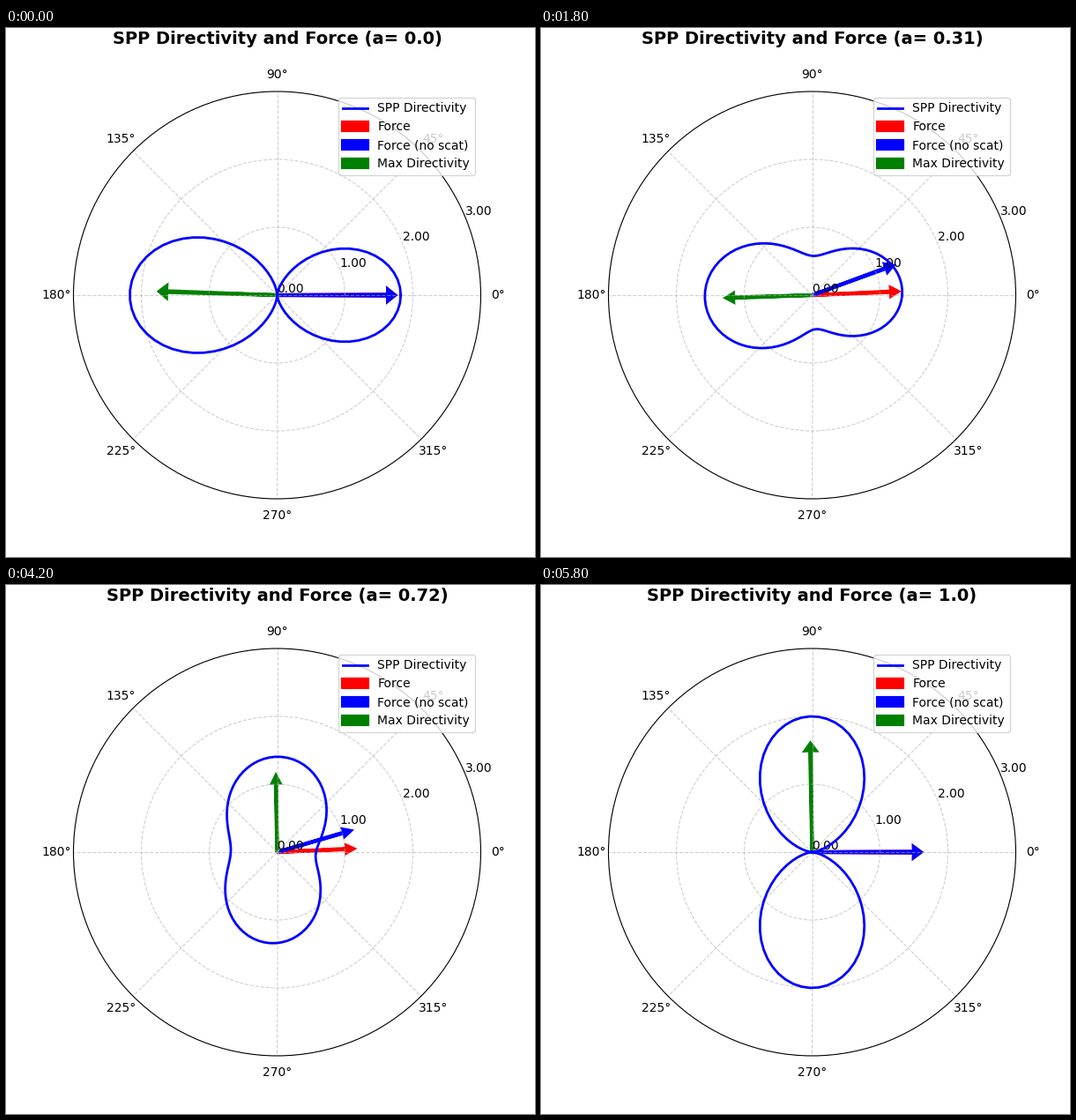
Animation of 600x600 px, one loop 6 s. Source, as a matplotlib script:

```python
import numpy as np
import matplotlib.pyplot as plt
from matplotlib.animation import FuncAnimation

FRAMES = 30
theta = np.linspace(0, 2 * np.pi, 100)
sweep = np.linspace(0, 1, FRAMES)

# Vertical dipole part and phase lag between the in-plane dipole parts
PZ = -0.0438 + 0.0198j
PHASE = np.exp(1.531j)


def directivity(a):
    px, py = np.sqrt(1.2 * (1 - a)), np.sqrt(a) * PHASE
    d = np.abs(px * (np.cos(theta) + PZ) + py * np.sin(theta)) ** 2
    return d / d[:-1].mean()


def force_angles(a):
    b = a / (a + 1.2 * (1 - a))
    s = np.sqrt(b * (1 - b))
    return 0.096 * s, np.arctan(s / (1.03 + 0.6 * b + 0.32 * b**2))


fig = plt.figure(figsize=(6, 6), dpi=100)
ax = fig.add_subplot(projection="polar")
line, = ax.plot(theta, directivity(0), color="blue", lw=2, label="SPP Directivity")


def add_arrow(color, label):
    return ax.arrow(0, 0, 0, 1, width=0.01, head_width=0.1, head_length=0.1,
                    length_includes_head=True, color=color, lw=3, label=label)


arrows = [add_arrow("red", "Force"),
          add_arrow("blue", "Force (no scat)"),
          add_arrow("green", "Max Directivity")]

ax.set_ylim(0, 3)
ax.set_yticks([0, 1, 2, 3])
ax.yaxis.set_major_formatter("{x:.2f}")
ax.grid(True, linestyle="--", alpha=0.6)
ax.legend(loc="upper right")
title = ax.set_title("", fontsize=14, fontweight="bold", pad=20)


def update(i):
    a = sweep[i]
    d = directivity(a)
    line.set_ydata(d)
    angles = *force_angles(a), theta[d.argmax()]
    for arrow, angle in zip(arrows, angles):
        arrow.set_data(x=angle, y=0, dx=0, dy=0.8 * d.max())
    title.set_text(f"SPP Directivity and Force (a= {round(float(a), 2)})")
    return line, title, *arrows


anim = FuncAnimation(fig, update, frames=FRAMES, interval=200, repeat=True)
plt.show()
```
